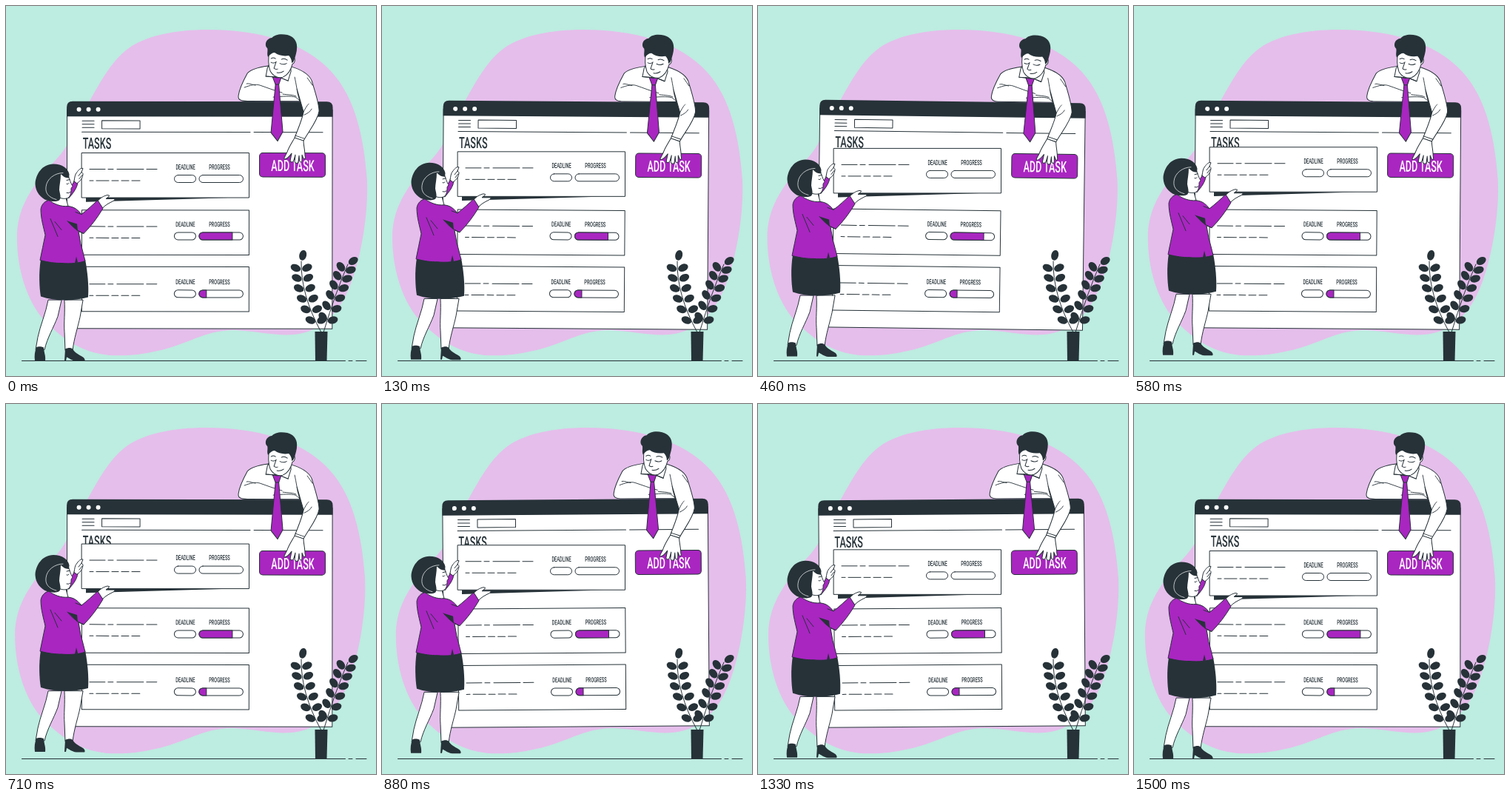
An HTML page that plays this animation: 500 px wide and 500 px high, repeating every 1540 ms.

```html
<!DOCTYPE html>
<html lang="en">
<head>
<meta charset="utf-8">
<title>Tasks</title>
<style>
  html, body { margin: 0; width: 100%; height: 100%; overflow: hidden; background: #bdece0; }
  svg { display: block; width: 100vw; height: 100vh; stroke-linecap: round; stroke-linejoin: round; }
  .ink { fill: #263238; stroke: none; }
  .line { fill: none; stroke: #263238; }
  .paper { fill: #fff; stroke: #263238; }
  .accent { fill: #a926c1; stroke: #263238; }
  .shine { fill: none; stroke: #fff; stroke-width: .7; }
  text { font-family: Roboto, "Liberation Sans", sans-serif; font-weight: 500; fill: #263238; }
</style>
</head>
<body>
<svg viewBox="0 0 500 500">
  <path id="blob" fill="#e5beeb" d="M15 313C15 280 28 258 42 238C58 215 76 203 85 183C98 158 104 142 114 127C128 102 142 76 162 60C186 40 230 32 273 32C340 32 403 48 440 89C473 125 484 180 488 235C490 275 482 330 468 370C456 404 440 425 415 437C385 452 350 440 310 438C270 437 245 458 205 466C180 472 160 473 140 472C100 468 75 448 52 425C28 398 15 355 15 313Z"/>
  <path class="line" d="M21.500 479.500H458.500M463 479.500H468M473 479.500H487"/>

  <g id="board">
    <path class="paper" d="M82.500 140H441V436H82.500Z"/>
    <path class="ink" d="M82 149.500V137Q82 129 90 129H433.500Q441.500 129 441.500 137V149.500Z"/>
    <g fill="#fff"><circle cx="98.500" cy="140" r="3"/><circle cx="111.500" cy="140" r="3"/><circle cx="124.500" cy="140" r="3"/></g>
    <path class="line" d="M103 155.500H119M103 160H119M103 164.500H119M129.500 155H181V166H129.500ZM102.500 170.500H330M335 170.500H428"/>
    <g id="list"></g>
    <rect class="accent" x="342.500" y="198.500" width="89" height="32.500" rx="4.500"/>

    <!-- man -->
    <path class="paper" d="M354 81C340 83 330 86 326 91C320 102 315 113 314 121C313 127 318 128.500 326 128.500H397C396 124 394 120 393 112L402 143C400 154 394 167 390 178L402 182C409 169 421 155 423 142C423 132 418 117 414 104C412 94 402 87 386 82Z"/>
    <path class="line" stroke-width=".9" d="M322 110C330 107 337 105 343 107C352 110 362 114 373 117M337 107C331 106 328 104 325 105M361 123C374 122 384 121 391 123C394 125 396 127 397 128M374 119C382 120 389 120 392 122M393 112C392 106 391 101 390 96M402 143C405 137 407 134 409 132M403 147C407 145 411 143 413 139M407 97C410 101 412 104 414 107"/>
    <path class="paper" d="M390 178C386 185 382 191 380 197C378 202 375 205 376 207C380 207 383 203 386 199L384 209C385 212 388 211 389 208L391 201L390 210C391 213 395 213 395 210L396 202L396.500 209C398 212 400 211 400 208L400 201L402 206C404 208 405 205 404 202C404 195 402 188 402 182Z"/>
    <path class="line" d="M391 175L403 179"/>
    <path class="paper" d="M356 78L353 84L351 95L364 96L369 96L381 101L385 88L384 78Z"/>
    <path class="accent" d="M360 95.500L366 97L372 96L368.500 106L374 170L367 182.500L358 171L364 106Z"/>
    <path class="line" d="M351 95L364 96M369 96L381 101M364 106L368.500 106"/>
    <path class="paper" d="M356 60C354 70 354 80 357 88C361 95 368 98 374 96C381 93 385 86 387 78C391 77 391 69 388 69L384 52H362Z"/>
    <path class="ink" d="M354 69C352 65 354 61 353 57C350 55 350 49 353 46C355 44 357 43 359 43C363 38 372 37 380 39C388 41 393 47 393 55C393 62 391 67 390 71C389 75 387 77 386 77C386 72 384 69 382 67C375 68 368 67 363 63C360 63 357 65 354 69Z"/>
    <path class="line" d="M358 71Q361 69 364 71M372 72Q376 70 380 73M358 76Q361 78 364 76M370 77.500Q375 80 379 77.500M365 75L362 84Q364 86 367 85M366 90Q371 91 375 88"/>
  </g>

  <g id="plant">
    <path class="line" d="M426 441Q398 390 399 345M429 441Q446 385 462 349"/>
    <path class="ink" d="M417.500 440H434.500L433.500 480H418Z"/>
  </g>

  <g id="lift">
    <path class="ink" d="M108 259V265L300 259.500Z"/>
    <g id="held"></g>

    <!-- woman -->
    <g transform="translate(0 .8)">
      <path class="accent" d="M83 249C88 246 91 238 93 234L97 238C96 245 92 251 85 259Z"/>
      <path class="paper" d="M92 236C93 231 93 227 96 224C98 221 101 218 104 219L102 224L104 226C104 231 101 236 96 239Z"/>
      <path class="line" d="M102 224L98 229M103 228L99 233"/>
      <path class="paper" d="M57 397C54 414 46 432 43 447L40 464H52C56 447 64 435 70 419L75 397ZM79 397C80 413 78 428 79 440L80 465H90C92 448 97 434 100 420L104 397Z"/>
      <path class="ink" d="M41 461C44 459 48 460 51 461C51 467 54 472 53 479H39C38 472 39 466 41 461ZM80 463C84 461 88 461 90 463C93 468 99 471 104 474C107 476 107 479 106 479.500H95C89 479 85 475 82 474L81 479H79Z"/>
      <path class="ink" d="M47 342C44 360 45 380 47 392C67 399 92 398 111 393C112 375 110 358 107 342Z"/>
      <path class="paper" d="M62 255L58 267C65 274 76 274 84 270L81 259Z"/>
      <path class="paper" d="M70 226L84 228C86 234 87 238 90 243L88 246C88 250 88 254 85 258C81 261 74 260 69 257L60 240Z"/>
      <path class="line" d="M82 240Q84 241 85 239M82 235L86 234M82 252Q85 253 87 251"/>
      <path class="ink" d="M85 232C80 232 76 229 74 226C74 235 72 242 72 248C73 254 75 259 72 262C67 265 59 263 55 262C47 259 40 251 39.500 240C40 227 49 213 64 213C76 213 84 219 85.500 227Z"/>
      <path class="shine" d="M77 225C66 225 55 233 54 244C53 252 57 258 68 261"/>
      <path class="paper" d="M123 264C127 259 132 256 137 255Q141 255 139 257L135 260L147 260Q148 262 143 264C139 266 135 268 131 272Z"/>
      <path class="accent" d="M58 262C52 263 48 268 47 274C47 287 51 299 53 309C51 320 48 332 46 343C58 346 66 347 75 347C87 348 99 347 107 344C105 336 103 328 101 321L98 304L105 307C115 297 124 285 131 273L124 262C117 268 110 275 102 281C97 275 93 271 84 270C74 271 65 267 58 262Z"/>
      <path class="ink" d="M83 290L97 304L96 294ZM93 347L95 338L97 346Z"/>
      <path class="line" d="M83 290C89 297 94 302 105 307M102 281L94 278M60 287L70 311M66 291L75 302"/>
    </g>
  </g>
</svg>
<script>
const $ = id => document.getElementById(id);

function add(parent, tag, attrs, content = '') {
  const el = document.createElementNS('http://www.w3.org/2000/svg', tag);
  for (const key in attrs) el.setAttribute(key, attrs[key]);
  el.textContent = content;
  return parent.appendChild(el);
}

// One narrow face for all lettering
function label(parent, content, x, y, size, fill = '#263238') {
  add(parent, 'text', {
    transform: `translate(${x} ${y}) scale(.6 1)`,
    'text-anchor': 'middle', 'font-size': size, style: `fill:${fill}`
  }, content);
}

function pill(parent, x, y, width) {
  add(parent, 'rect', { class: 'paper', x, y, width, height: 10, rx: 5 });
}

const dashes = [
  [22, 113, 134], [22, 138, 145], [22, 150, 186], [22, 190, 204],
  [37.5, 113, 118], [37.5, 122, 139], [37.5, 143, 152], [37.5, 156, 166], [37.5, 170, 181]
];

function card(parent, y, done, drop = 0) {
  add(parent, 'rect', { class: 'paper', x: 102.5, y, width: 226, height: 60.5 });
  const g = add(parent, 'g', { transform: `translate(0 ${y + drop})` });
  const d = dashes.map(([dy, a, b]) => `M${a} ${dy}H${b}`).join('');
  add(g, 'path', { class: 'line', d });
  label(g, 'DEADLINE', 242.5, 22.2, 9.4);
  label(g, 'PROGRESS', 288.5, 22.2, 9.4);
  pill(g, 227.5, 30, 29);
  pill(g, 261, 30, 59.5);
  if (done) {
    add(g, 'path', {
      class: 'accent',
      d: `M${261 + done} 30H266A5 5 0 0 0 266 40H${261 + done}Z`
    });
  }
}

card($('list'), 276, 45);
card($('list'), 352.5, 10, 1.4);
card($('held'), 198.8, 0);
label($('list'), 'TASKS', 123, 193, 21);

const button = $('board').querySelector('rect.accent');
const caption = add($('board'), 'g', {});
button.after(caption);
label(caption, 'ADD TASK', 387.5, 223, 21, '#fff');

// Leaves sit in pairs along each stem, with one at the tip
function leaf(x, y, turn) {
  add($('plant'), 'ellipse', {
    class: 'ink', cx: 8.5, rx: 7, ry: 4.9,
    transform: `translate(${x} ${y}) rotate(${turn})`
  });
}

function branch([x0, y0], [x1, y1], [x2, y2], left, right, tip) {
  const at = (a, b, c, u) => a * (1 - u) ** 2 + 2 * b * u * (1 - u) + c * u * u;
  for (let i = 0; i < 6; i++) {
    const u = .13 + i * .147;
    const x = at(x0, x1, x2, u), y = at(y0, y1, y2, u);
    leaf(x, y, left);
    leaf(x, y, right);
  }
  leaf(x2, y2, tip);
}

branch([426, 441], [398, 390], [399, 345], -157, -25, -75);
branch([429, 441], [446, 385], [462, 349], -128, -16, -32);

// Evenly spaced stops, joined by straight lines
const shake = [0, -1, 2, -4, 4, -4, 4, -4, 2, -1, 0];
const sway = [0, 1, 0, -1, 0];
const hover = [0, -10, 0];

function track(stops, p) {
  const pos = p * (stops.length - 1), i = Math.floor(pos);
  return stops[i] + (stops[i + 1] - stops[i]) * (pos - i);
}

const LOOP = 1540, STEP = 1000 / 24, CYCLE = 36;
const start = performance.now();

function draw(now) {
  const t = Math.max(0, now - start) % LOOP;
  const step = Math.min(CYCLE, Math.floor((t + 5) / STEP));
  const p = (step + .5) / CYCLE % 1;
  $('blob').setAttribute('transform', `translate(${track(shake, p)} 0)`);
  $('board').setAttribute('transform', `rotate(${track(sway, p)} 262 237)`);
  $('lift').setAttribute('transform', `translate(0 ${track(hover, p)})`);
  requestAnimationFrame(draw);
}
draw(start);
</script>
</body>
</html>
```
